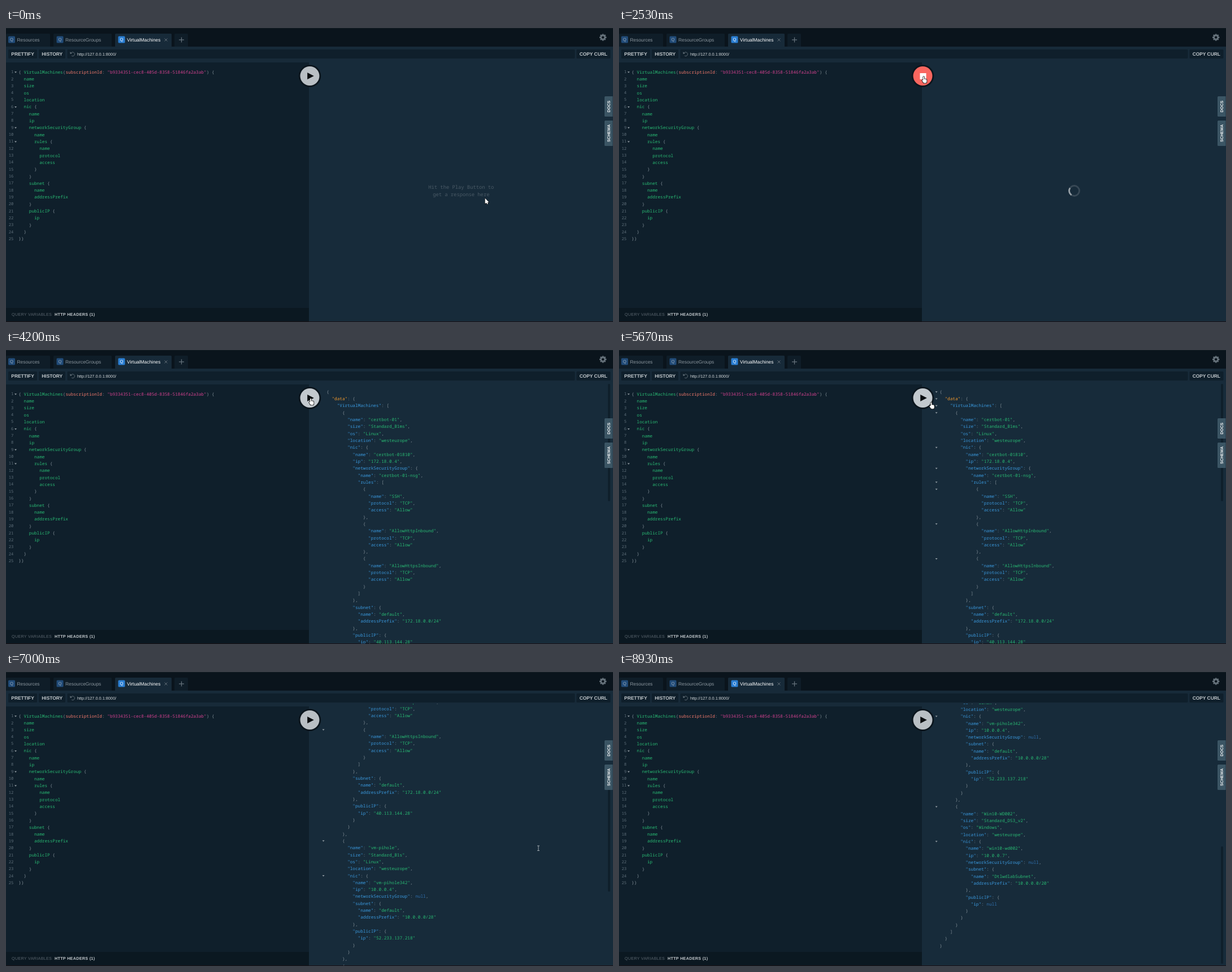
These frames come from a looping animation (1074 by 521 pixels, 9390 ms). An HTML page with a canvas:

```html
<!DOCTYPE html>
<html lang="en">
<head>
<meta charset="utf-8">
<title>Query playground</title>
<style>
  html, body { margin: 0; width: 100%; height: 100%; overflow: hidden; background: #0a141c; }
  canvas { display: block; }
</style>
</head>
<body>
<canvas id="stage" width="1074" height="521"></canvas>
<script>
const ctx = document.getElementById('stage').getContext('2d');
const W = 1074, H = 521, SPLIT = 536, LOOP = 9390, STEP = 200 / 3, TURN = Math.PI * 2;
const CELL = 4.617, LINE = 12.32, SCROLL_MAX = 550, SWIPE = 425;
const CLICK = 1500, REPLY = 4070, FOLDS = 4470, SETTLED = 7530;
const MONO = '"Noto Sans Mono", "DejaVu Sans Mono", monospace';
const SANS = '"Liberation Sans", Arial, sans-serif';
const C = {
  nav: '#0a141c', bar: '#172a39', editor: '#0f1f2b', result: '#172b3a', footer: '#0b1821',
  green: '#29b973', blue: '#3a98dc', orange: '#f29a2e', pink: '#d2418f', salmon: '#f0796c',
  punct: '#7d8a93', number: '#5f6f7a', atom: '#2f6eab', label: '#c5cbcf', icon: '#65717a'
};

const query = `{ VirtualMachines(subscriptionId: "b9334351-cec8-405d-8358-51846fa2a3ab") {
  name
  size
  os
  location
  nic {
    name
    ip
    networkSecurityGroup {
      name
      rules {
        name
        protocol
        access
      }
    }
    subnet {
      name
      addressPrefix
    }
    publicIP {
      ip
    }
  }
}}`.split('\n');

const rule = name => ({ name, protocol: 'TCP', access: 'Allow' });
const machine = (name, size, os, nicName, ip, networkSecurityGroup, subnet, addressPrefix, publicIp) => ({
  name, size, os, location: 'westeurope',
  nic: {
    name: nicName, ip, networkSecurityGroup,
    subnet: { name: subnet, addressPrefix },
    publicIP: { ip: publicIp }
  }
});
const reply = JSON.stringify({ data: { VirtualMachines: [
  machine('certbot-01', 'Standard_B1ms', 'Linux', 'certbot-01810', '172.18.0.4',
    { name: 'certbot-01-nsg', rules: ['SSH', 'AllowHttpInbound', 'AllowHttpsInbound'].map(rule) },
    'default', '172.18.0.0/24', '40.113.144.28'),
  machine('vm-pihole', 'Standard_B1s', 'Linux', 'vm-pihole342', '10.0.0.4', null,
    'default', '10.0.0.0/28', '52.233.137.218'),
  machine('Win10-WD002', 'Standard_DS3_v2', 'Windows', 'win10-wd002', '10.0.0.7', null,
    'DtlwdlabSubnet', '10.0.0.0/20', null)
] } }, null, 2).split('\n');

function queryColor(token) {
  if (token[0] === '"') return C.pink;
  if (token === 'subscriptionId') return C.salmon;
  return /\w/.test(token) ? C.green : C.punct;
}
function replyColor(token, next) {
  if (token === 'null') return C.atom;
  if (token[0] !== '"') return C.punct;
  if (next !== ':') return C.green;
  return token === '"data"' ? C.orange : C.blue;
}
function tokenize(rows, color) {
  return rows.map(row => [...row.matchAll(/"[^"]*"|\w+|[^\w\s"]+/g)].map(m => ({
    text: m[0], col: m.index, color: color(m[0], row[m.index + m[0].length])
  })));
}
// Only blocks spanning at least four lines get a fold marker.
function findFolds(rows) {
  const open = [], folds = new Set();
  rows.forEach((row, i) => {
    for (const ch of row) {
      if ('{['.includes(ch)) open.push(i);
      if ('}]'.includes(ch)) {
        const start = open.pop();
        if (i - start >= 4) folds.add(start);
      }
    }
  });
  return [...folds];
}
const queryTokens = tokenize(query, queryColor), queryFolds = findFolds(query);
const replyTokens = tokenize(reply, replyColor), replyFolds = findFolds(reply);

const ramp = (t, from, to) => Math.min(1, Math.max(0, (t - from) / (to - from)));
const smooth = p => p * p * (3 - 2 * p);
const mix = (a, b, p) => a + (b - a) * p;

// The wheel speeds up through the first swipe and coasts to the end in the second.
const scrollAt = t => SWIPE * ramp(t, 6500, 7130) ** 2
  + (SCROLL_MAX - SWIPE) * (1 - (1 - ramp(t, 7200, SETTLED)) ** 2.15);

const moves = [
  { from: 70, to: 600, x: 438, y: 112 },
  { from: 600, to: 930, x: 539, y: 86 },
  { from: 5600, to: 6270, x: 976, y: 308 },
  { from: 6530, to: 6800, x: 942, y: 312 },
  { from: 8330, to: 8930, x: 74, y: 524 }
];
function cursorAt(t) {
  return moves.reduce((at, move) => {
    const p = smooth(ramp(t, move.from, move.to));
    return { x: mix(at.x, move.x, p), y: mix(at.y, move.y, p) };
  }, { x: 847.7, y: 301.7 });
}
const overButton = ({ x, y }) => Math.hypot(x - 537.5, y - 85) < 18;

function box(x, y, w, h, color, r = 0) {
  ctx.fillStyle = color;
  ctx.beginPath();
  ctx.roundRect(x, y, w, h, r);
  ctx.fill();
}
function text(str, x, y, size, color, { bold = false, family = SANS, align = 'left', spacing = 0 } = {}) {
  ctx.font = `${bold ? 'bold ' : ''}${size}px ${family}`;
  ctx.letterSpacing = spacing + 'px';
  ctx.textAlign = align;
  ctx.fillStyle = color;
  ctx.fillText(str, x, y);
}
function triangle(x1, y1, x2, y2, x3, y3, color) {
  ctx.fillStyle = color;
  ctx.beginPath();
  ctx.moveTo(x1, y1);
  ctx.lineTo(x2, y2);
  ctx.lineTo(x3, y3);
  ctx.fill();
}
function line(x1, y1, x2, y2, color, width) {
  ctx.strokeStyle = color;
  ctx.lineWidth = width;
  ctx.beginPath();
  ctx.moveTo(x1, y1);
  ctx.lineTo(x2, y2);
  ctx.stroke();
}
function disc(x, y, r, color) {
  box(x - r, y - r, 2 * r, 2 * r, color, r);
}
function arc(x, y, r, from, to, color, width) {
  ctx.strokeStyle = color;
  ctx.lineWidth = width;
  ctx.beginPath();
  ctx.arc(x, y, r, from, to);
  ctx.stroke();
}
function at(x, y, angle, paint) {
  ctx.save();
  ctx.translate(x, y);
  ctx.rotate(angle);
  paint();
  ctx.restore();
}
// A two-armed cross; turned by an eighth it becomes the close mark.
function drawPlus(x, y, r, angle, width) {
  at(x, y, angle, () => {
    line(-r, 0, r, 0, C.icon, width);
    line(0, -r, 0, r, C.icon, width);
  });
}

function drawCode(rows, x, y) {
  rows.forEach((row, i) => row.forEach(t =>
    text(t.text, x + t.col * CELL, y + i * LINE, 7.7, t.color, { family: MONO })));
}
function drawFolds(folds, x, y) {
  for (const i of folds) {
    const cy = y + i * LINE;
    triangle(x - 2, cy - 1, x + 2, cy - 1, x, cy + 1.5, '#929ca3');
  }
}

function drawTab(x, w, label, active) {
  box(x, 10, w, 23, active ? C.bar : '#0f1d28', [1.5, 1.5, 0, 0]);
  const left = x + (x ? 5.5 : 4);
  box(left, 14.5, 12, 12, active ? '#2a7ed3' : '#214b78', 1.5);
  text('Q', left + 6, 23.4, 7.6, active ? '#fff' : '#9aabba', { align: 'center' });
  text(label, left + 15.5, 23.8, 8.4, active ? '#fff' : '#8a959d');
}
function drawGear() {
  at(1056.2, 16.6, 0, () => {
    for (let i = 0; i < 8; i++) {
      box(-1.4, -6.2, 2.8, 3, C.icon, 0.5);
      ctx.rotate(TURN / 8);
    }
    arc(0, 0, 3.5, 0, TURN, C.icon, 2.6);
  });
}
function drawField(x, w, label = '') {
  box(x, 38, w, 16, C.editor, 1.5);
  text(label, x + 5.3, 49, 8.4, C.label, { bold: true });
}
function drawSideTab(y, h, label) {
  box(1059, y, 14.5, h, '#3b5564', [1.5, 0, 0, 1.5]);
  at(1069.2, y + h / 2, -TURN / 4, () =>
    text(label, 0, 0, 7.2, '#f2f4f5', { bold: true, align: 'center' }));
}

function drawChrome() {
  box(0, 0, W, H, C.nav);
  box(0, 0, W, 1, '#141d24');
  drawTab(0, 78, 'Resources', false);
  drawTab(84, 103, 'ResourceGroups', false);
  drawTab(193, 100, 'VirtualMachines', true);
  drawPlus(283, 21, 3.5, TURN / 8, 0.9);
  box(298, 10, 24, 23, '#0f1d28', [1.5, 1.5, 0, 0]);
  drawPlus(310.5, 21, 4.5, 0, 1.3);
  drawGear();

  box(0, 33, W, 28, C.bar);
  drawField(4, 51, 'PRETTIFY');
  drawField(58, 47, 'HISTORY');
  drawField(108.5, 898);
  drawField(1009.4, 60, 'COPY CURL');
  text('http://127.0.0.1:8000/', 126, 48.6, 7.3, '#d3d8db');
  arc(118, 46.3, 3.5, -2.6, 2.2, C.icon, 0.9);
  triangle(113.2, 42.3, 113.6, 46, 117, 45, C.icon);

  box(0, 61, SPLIT, 435, C.editor);
  box(SPLIT, 56, W, 464, C.result);
  box(0, 496, SPLIT, 24, C.footer);
  text('QUERY VARIABLES', 10, 510.3, 7.2, '#5b666f', { spacing: 0.3 });
  text('HTTP HEADERS (1)', 86, 510.3, 7.2, C.label, { bold: true, spacing: 0.3 });
  box(0, 520, W, 1, '#1a1216');
}

function drawQuery() {
  query.forEach((_, i) =>
    text(i + 1, 13.3, 80.2 + i * LINE, 7.2, C.number, { family: MONO, align: 'right' }));
  drawCode(queryTokens, 22.3, 80.7);
  drawFolds(queryFolds, 17, 78.3);
}

function drawReply(t) {
  const scroll = scrollAt(t), thumb = 208;
  ctx.save();
  ctx.beginPath();
  ctx.rect(SPLIT, 56, W - SPLIT, 464);
  ctx.clip();
  drawCode(replyTokens, 567.2, 76.8 - scroll);
  // Lines first rendered by scrolling get their markers once it settles.
  if (t >= FOLDS) {
    drawFolds(replyFolds.filter(i => i < 52 || t >= SETTLED), 561.6, 74.2 - scroll);
  }
  ctx.restore();
  box(1065, mix(60, 517 - thumb, scroll / SCROLL_MAX), 4, thumb, C.editor, 2);
}

function drawSpinner(t) {
  const angle = (t - CLICK) / 600 * TURN - TURN / 4;
  arc(805.5, 288.5, 9, 0, TURN, 'rgba(255,255,255,.14)', 2.8);
  arc(805.5, 288.5, 9, angle - TURN / 8, angle + TURN / 8, 'rgba(255,255,255,.48)', 2.8);
}
function drawHint() {
  ['Hit the Play Button to', 'get a response here'].forEach((row, i) =>
    text(row, 805.3, 284.9 + i * 13.5, 8.8, '#4a5a66', { family: MONO, align: 'center' }));
}

function drawButton(t) {
  const busy = ramp(t, 1470, 1555) * (1 - ramp(t, 4030, 4200));
  const gray = overButton(cursorAt(t)) ? 195 : 185;
  const rgb = [mix(gray, 249, busy), mix(gray + 6, 102, busy), mix(gray + 11, 95, busy)];
  disc(537.5, 85, 19.8, '#0b151d');
  disc(537.5, 85, 17, `rgb(${rgb.map(Math.round)})`);
  if (t >= CLICK && t < REPLY) box(532.5, 80, 11, 11, '#fff');
  else triangle(533.2, 79, 544.8, 85, 533.2, 91, '#0a0d10');
}

function drawArrow() {
  line(2.4, 5, 4.6, 10.6, '#111', 3);
  triangle(-0.6, -1, -0.6, 10.6, 7.6, 7.3, '#111');
  triangle(0, 0, 0, 9.4, 6.4, 6.8, '#fff');
  line(2.4, 5, 4.4, 10.2, '#fff', 1.7);
}
function drawHand() {
  for (const [grow, color] of [[0.8, '#111'], [0, '#fff']]) {
    const part = (x, y, w, h, r) => box(x - grow, y - grow, w + 2 * grow, h + 2 * grow, color, r + grow);
    part(-0.8, 0, 1.9, 9, 0.9);
    part(-0.8, 4.6, 6.2, 6.8, 1.8);
    at(-2.6, 6.4, -0.6, () => part(-0.6, 0, 1.8, 5, 0.9));
  }
}
function drawBeam() {
  for (const y of [-4, 4.5]) line(-2, y, 2, y, '#aeb6bb', 0.9);
  line(0, -4, 0, 4.5, '#aeb6bb', 0.9);
}
function drawCursor(t) {
  const { x, y } = cursorAt(t);
  const overText = y > 61 && y < 496 && (x < SPLIT || t >= REPLY);
  const near = Math.hypot(x - 537.5, y - 85) < 20;
  at(x, y, 0, near ? drawHand : overText ? drawBeam : drawArrow);
}

function draw(t) {
  drawChrome();
  drawQuery();
  if (t < CLICK) drawHint();
  else if (t < REPLY) drawSpinner(t);
  else drawReply(t);
  drawSideTab(121, 36, 'DOCS');
  drawSideTab(164, 45, 'SCHEMA');
  drawButton(t);
  drawCursor(t);
}

function frame(now) {
  const t = now % LOOP;
  draw(Math.round(Math.floor((t + 3.4) / STEP) * STEP / 10) * 10);
  requestAnimationFrame(frame);
}
ctx.textRendering = 'geometricPrecision';
draw(0);
requestAnimationFrame(frame);
</script>
</body>
</html>
```
